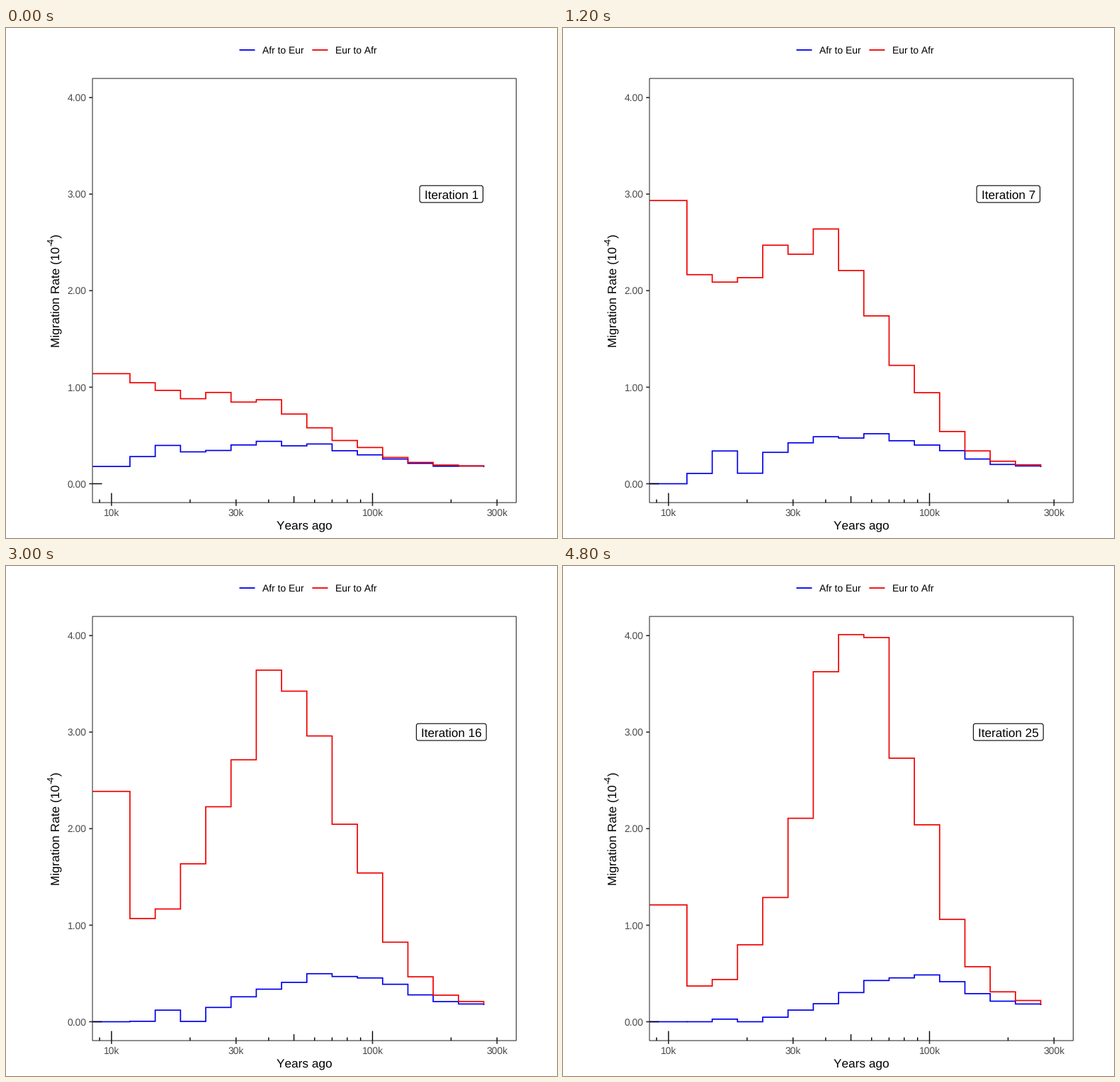
Write a matplotlib script that moves like this. It is 778 by 719 pixels and loops after 5 s.

```python
import matplotlib.pyplot as plt
import numpy as np
from matplotlib.animation import FuncAnimation
from matplotlib.patches import FancyBboxPatch, Rectangle

W, H, DPI = 778, 719, 100
ITERATIONS, INTERVAL = 25, 200
LEFT, RIGHT, TOP, BOTTOM = 121.6, 719.9, 70.6, 668.6
ZERO_Y, UNIT_Y = 642, 136.1
FIRST_EDGE, BIN_WIDTH, BINS = 174.5, 35.68, 15
RED, BLUE = "#F00000", "#0000EB"
AXIS_GREY, LABEL_GREY = "#333333", "#484848"

plt.rcParams.update({"font.family": "Liberation Sans", "text.hinting": "none",
                     "text.kerning_factor": 6})

bins = np.arange(BINS)
edges = np.r_[LEFT, FIRST_EDGE + BIN_WIDTH * bins]


def rates(i, gain, decay, power, floor):
    """Each time bin grows as a power of the iteration; recent bins also decay."""
    progress = (i + 1) / ITERATIONS
    decay = np.pad(decay, (0, BINS - len(decay)))
    return floor + gain * progress ** power * np.exp(-decay * progress ** 1.5)


EUR_TO_AFR = dict(
    gain=np.array([9.3, 8.5, 7.7, 6.8, 7.4, 6.4, 6.6, 5.17, 3.8, 2.55, 1.86, .88, .39, .13, .04]),
    decay=[2.2, 3.8, 3.4, 2.4, 1.9, 1.2, .65, .3],
    power=.7, floor=.18)
AFR_TO_EUR = dict(
    gain=np.array([.55, .49, .66, .58, .57, .66, .72, .64, .67, .555, .485, .415, .291, .213, .184]),
    decay=[80, 9, 3.2, 10, 2.5, 1.7, 1.35, .75, .45, .2],
    power=.15 * np.clip((BINS - 1 - bins) / 3, 0, 1), floor=0)

fig = plt.figure(figsize=(W / DPI, H / DPI), dpi=DPI, facecolor="white")
ax = fig.add_axes([0, 0, 1, 1])
ax.set(xlim=(-.5, W - .5), ylim=(H - .5, -.5))
ax.axis("off")


def px(size):
    return size * 72 / DPI


def line(xs, ys, color, width, z=2):
    return ax.plot(xs, ys, color=color, lw=px(width), zorder=z, snap=False,
                   solid_capstyle="butt", solid_joinstyle="miter")[0]


def label(x, y, text, size, color="black", ha="left", **kw):
    return ax.text(x, y, text, fontsize=px(size), color=color, ha=ha,
                   va="baseline", zorder=6, **kw)


def year_x(kiloyears):
    return 148.5 + 368.5 * np.log10(kiloyears / 10)


# Panel, axes and inner log ticks
ax.add_patch(Rectangle((LEFT, TOP), RIGHT - LEFT, BOTTOM - TOP, fill=False,
                       ec=AXIS_GREY, lw=px(1.1), zorder=4, snap=False))
for value in range(5):
    y = ZERO_Y - UNIT_Y * value
    line([LEFT - 4.7, LEFT], [y, y], AXIS_GREY, 1.7)
    label(113.2, y + 5, f"{value:.2f}", 13.9, LABEL_GREY, "right")
for k in (10, 30, 100, 300):
    line([year_x(k)] * 2, [BOTTOM, BOTTOM + 4.7], AXIS_GREY, 1.7)
    label(year_x(k), 687.3, f"{k}k", 13.9, LABEL_GREY, "center")
for k in [9, *range(10, 100, 10), 100, 200, 300]:
    length = 13.5 if k in (10, 100) else 9 if k == 50 else 4.5
    line([year_x(k)] * 2, [BOTTOM, BOTTOM - length], "black", 1.4, 5)
line([LEFT, LEFT + 13.5], [ZERO_Y] * 2, "black", 1.4, 5)

label(420.7, 707, "Years ago", 17.3, ha="center")
vertical = dict(rotation=90, rotation_mode="anchor")
label(75, 450, "Migration Rate (10", 17.3, **vertical)
label(67, 306.5, "-4", 12.5, **vertical)
label(75, 295.5, ")", 17.3, **vertical)

# Legend
for x, text, color in ((329, "Afr to Eur", BLUE), (431.9, "Eur to Afr", RED)):
    line([x, x + 22], [30.5, 30.5], color, 1.8)
    label(x + 33, 35.6, text, 13.9)

# Moving parts
blue_line = line([], [], BLUE, 1.7, 2)
red_line = line([], [], RED, 1.7, 3)
badge = FancyBboxPatch((587, 224.7), 83, 17.8, boxstyle="round,pad=3,rounding_size=3.3",
                       fc="white", ec="black", lw=px(1.1), zorder=5)
ax.add_patch(badge)
badge_text = label(628.2, 240, "", 17.1, ha="center")


def set_steps(artist, values, end):
    artist.set_data(np.repeat(edges, 2)[1:],
                    ZERO_Y - UNIT_Y * np.r_[np.repeat(values, 2), end])


def update(i):
    set_steps(blue_line, rates(i, **AFR_TO_EUR), .172)
    set_steps(red_line, rates(i, **EUR_TO_AFR), .18)
    badge_text.set_text(f"Iteration {i + 1}")
    half = 44.7 if i < 9 else 49.4
    badge.set_x(628.3 - half + 3)
    badge.set_width(2 * half - 6)
    return blue_line, red_line, badge, badge_text


anim = FuncAnimation(fig, update, frames=ITERATIONS, interval=INTERVAL,
                     repeat=True, repeat_delay=0)
plt.show()
```
